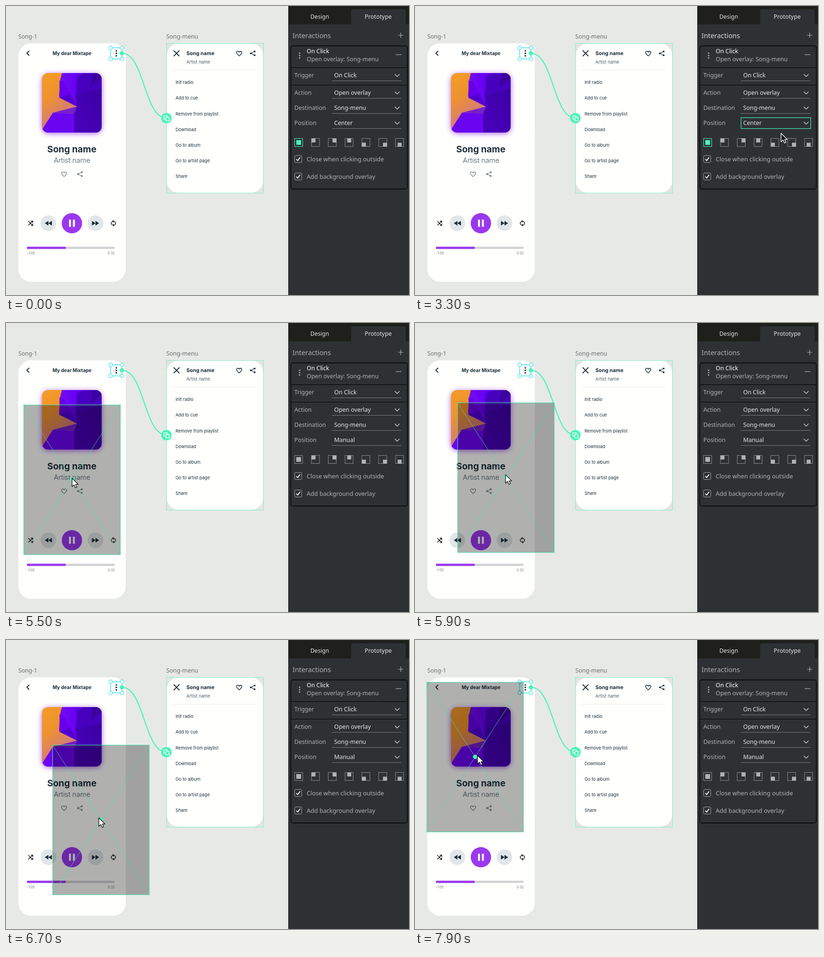
An HTML page for the animation above (8 s loop, 851 by 612 pixels).

```html
<!DOCTYPE html>
<html lang="en">
<head>
<meta charset="utf-8">
<title>Overlay position</title>
<style>
html, body { margin: 0; width: 100%; height: 100%; overflow: hidden; background: #e7e9e7; }
svg { display: block; width: 100%; height: 100%; }
.ui { font-family: "Noto Sans", "Open Sans", sans-serif; }
.app { font-family: Inter, Roboto, sans-serif; }
</style>
</head>
<body>
<svg id="stage" viewBox="0 0 851 612"></svg>
<script>
const GREEN = '#49f4b9', PANEL = '#2e3134', INK = '#1c2f3a', GREY = '#b1b2b5', LIGHT = '#e6e6e6', PAPER = '#fffffd';
const LOOP = 8000, STEP = 100;

const el = (tag, attrs, body = '') =>
  `<${tag} ${Object.entries(attrs).map(([k, v]) => `${k}="${v}"`).join(' ')}>${body}</${tag}>`;
const rect = (x, y, width, height, fill, more = {}) => el('rect', { x, y, width, height, fill, ...more });
const circle = (cx, cy, r, fill, more = {}) => el('circle', { cx, cy, r, fill, ...more });
const line = (d, stroke, width = 1, more = {}) =>
  el('path', { d, fill: 'none', stroke, 'stroke-width': width, ...more });
const shape = (d, fill, more = {}) => el('path', { d, fill, ...more });
const group = (body, attrs = {}) => el('g', attrs, body);

// y is the middle of the capital letters
const text = (s, x, y, size, fill, more = {}) =>
  el('text', { x, y: y + size * 0.36, 'font-size': size, fill, ...more }, s);
const mid = { 'text-anchor': 'middle' };

const heart = (x, y, color, w) => line(
  `M${x} ${y + 5}C${x - 4} ${y + 1.5} ${x - 5.5} ${y} ${x - 5.5} ${y - 2}C${x - 5.5} ${y - 5.5} ${x - 1.5} ${y - 6} ${x} ${y - 3}` +
  `C${x + 1.5} ${y - 6} ${x + 5.5} ${y - 5.5} ${x + 5.5} ${y - 2}C${x + 5.5} ${y} ${x + 4} ${y + 1.5} ${x} ${y + 5}Z`, color, w);
const share = (x, y, color) =>
  line(`M${x + 4} ${y - 4}L${x - 4} ${y}L${x + 4} ${y + 4}`, color, 1.2) +
  [[4, -4], [-4, 0], [4, 4]].map(([a, b]) => circle(x + a, y + b, 1.9, color)).join('');
const dots = (x, y, gap, r, color) => [-1, 0, 1].map(i => circle(x, y + i * gap, r, color)).join('');

function cover() {
  return rect(76, 144, 126, 126, '#8a2be2', { rx: 14, filter: 'url(#glow)', opacity: 0.75 }) +
    group(
      rect(76, 142, 126, 126, 'url(#warm)') +
      shape('M118 142H202V268H144V226L150 213L112 192L114 158Z', 'url(#violet)') +
      shape('M146 190L202 172V268H144V226L150 213Z', 'url(#deep)') +
      shape('M150 150L166 142H202V174L147 190Z', '#4700bd') +
      shape('M183 142H202V152L178 172Z', '#3c009f') +
      shape('M113 158L113 194L136 186L122 160Z', '#6800ec') +
      shape('M112 194L136 186L150 213Z', '#5200d2') +
      shape('M76 262L99 226L144 228V268H76Z', '#6a05f2') +
      shape('M99 226L150 213L144 228Z', '#7420c8'), { 'clip-path': 'url(#coverClip)' });
}

function player() {
  const skip = (x, s) =>
    circle(x, 460, 16.5, '#e1e6e8') +
    shape(`M${x} 455V465L${x - 7.5 * s} 460ZM${x + 7.5 * s} 455V465L${x} 460Z`, INK);
  return text('Song-1', 26, 65, 12.2, '#6b6f70', { class: 'ui' }) +
    rect(26, 79, 227, 505, PAPER, { rx: 27 }) +
    line('M49 95L44 100L49 105', INK, 1.8) +
    text('My dear Mixtape', 139.5, 100.5, 10, INK, { ...mid, 'font-weight': 700 }) +
    dots(233, 100.3, 5.2, 1.7, INK) + cover() +
    text('Song name', 139, 303.5, 19, INK, { ...mid, 'font-weight': 700 }) +
    text('Artist name', 139.5, 327, 14.6, '#40525c', { ...mid, 'font-weight': 300 }) +
    heart(122.7, 356.3, '#77838a', 1.3) + share(156, 356, '#77838a') +
    line('M47 455.5L56.5 465M47 464.5L56 456M52.5 455.5H56.5V459.5M52.5 464.8H56.5V460.8', '#15181a', 1.3) +
    skip(89.5, 1) + circle(139.2, 460, 21.5, '#9b38ef') +
    rect(133, 452.5, 4.2, 15, '#fff') + rect(141.2, 452.5, 4.2, 15, '#fff') + skip(189, -1) +
    line('M226.5 456A4.2 4.2 0 0 1 230 463.2M227 464.2A4.2 4.2 0 0 1 223.6 457', '#15181a', 1.4) +
    shape('M227 453V459L223.8 456ZM226.6 461V467L229.8 464Z', '#15181a') +
    rect(44, 509.7, 185.5, 4.8, '#d0d2d3', { rx: 2 }) + rect(44, 509.7, 82.5, 4.8, '#9b38ef', { rx: 2 }) +
    text('-1:05', 44, 523.5, 7, '#68757c') + text('3:32', 229.5, 523.5, 7, '#68757c', { 'text-anchor': 'end' });
}

function menu() {
  const items = ['Init radio', 'Add to cue', 'Remove from playlist', 'Download', 'Go to album', 'Go to artist page', 'Share'];
  return text('Song-menu', 338.5, 65, 12.4, '#6b6f70', { class: 'ui' }) +
    rect(339, 79, 205, 317, '#e4e6e3') + rect(339, 79, 204.5, 317, PAPER, { rx: 27 }) +
    rect(339, 79.3, 204.7, 316.9, 'none', { stroke: '#7cebc8' }) +
    line('M354 94.2L366.2 106.4M366.2 94.2L354 106.4', '#15252e', 1.9) +
    text('Song name', 381, 100.5, 10.8, INK, { 'font-weight': 700 }) +
    text('Artist name', 381, 119, 9.3, '#4f5f68') +
    heart(492.5, 100.7, INK, 1.4) + share(521, 100.3, INK) +
    line('M351 136H528', '#e9eae9') +
    items.map((s, i) => text(s, 358, 162 + i * 33.1, 9.2, INK)).join('');
}

function connector() {
  const corners = [[221, 88.5], [245, 88.5], [221, 112], [245, 112]];
  return rect(221, 88.5, 24, 23.5, 'none', { stroke: '#31dfe2', 'stroke-width': 1.3 }) +
    corners.map(([x, y]) => circle(x, y, 3.8, '#fff', { stroke: '#31dfe2', 'stroke-width': 1.2 })).join('') +
    line('M245 100C292 100 292 237 338 237', GREEN, 2.2) + circle(244.7, 100.2, 4.6, GREEN) +
    circle(338.7, 237.4, 11, GREEN) +
    rect(333.5, 232.5, 7, 7, 'none', { stroke: '#fff', 'stroke-width': 1.4 }) +
    rect(337.5, 236, 7, 7, GREEN, { stroke: '#fff', 'stroke-width': 1.4 });
}

function panel() {
  const chevron = y => line(`M821 ${y - 2.6}L826 ${y + 2.4}L831 ${y - 2.6}`, LIGHT, 1.3);
  const field = (label, value, y, id) =>
    text(label, 609, y, 12.3, GREY) + text(value, 693, y, 12.4, LIGHT, id ? { id } : {}) +
    line(`M688 ${y + 11.5}H835`, '#7b7e80') + chevron(y);
  const check = (label, y) =>
    rect(609.5, y - 7.5, 15, 15, PANEL, { rx: 2.5, stroke: '#a3a5a7' }) +
    line(`M613 ${y + 0.3}L616 ${y + 3.3}L621 ${y - 3.5}`, '#fff', 1.8) +
    text(label, 635, y, 12.65, GREY);
  const spots = [[4, 4], [0, 0], [9, 0], [4.5, 0], [0, 9], [9, 9], [4.5, 9]];
  const places = spots.map(([dx, dy], i) => {
    const x = 609 + i * 35.5;
    return rect(x + 0.5, 280.5, 17, 17, 'none', { stroke: '#8b8e90', class: i ? '' : 'center-box' }) +
      rect(x + dx + (i ? 0.5 : 0), 280 + dy + (i ? 0.5 : 0), i ? 8.5 : 10, i ? 8.5 : 10, GREY, { class: i ? '' : 'center-fill' });
  }).join('');
  return rect(596, 0, 255, 612, PANEL) + rect(596, 0, 255, 39, '#1f1f1c') +
    line('M596.5 0V612', '#222426') +
    shape('M729 39V10Q729 7 732 7H841Q844 7 844 10V39Z', PANEL) +
    text('Design', 662.5, 23, 12.1, LIGHT, { ...mid }) + text('Prototype', 786, 23, 12.3, LIGHT, { ...mid }) +
    text('Interactions', 605, 62.5, 14.4, GREY, { id: 'title' }) +
    line('M828 62H839M833.5 56.5V67.5', GREY, 1.2) +
    rect(601.5, 84.5, 246, 303, 'none', { rx: 4, stroke: '#000', 'stroke-width': 1.3 }) +
    line('M602 130.5H847M602 167.5H847', '#000', 1.2) +
    dots(620, 105, 5, 1.5, GREY) +
    text('On Click', 635, 96, 12.4, '#fff') + text('Open overlay: Song-menu', 635, 113, 12.45, GREY) +
    line('M823 103H835', GREY, 1.2) +
    field('Trigger', 'On Click', 147) + field('Action', 'Open overlay', 184) +
    field('Destination', 'Song-menu', 216) + field('Position', 'Center', 248, 'value') +
    rect(688.5, 236.5, 147, 23, 'none', { id: 'focus', stroke: GREEN, 'stroke-width': 1.2 }) +
    places + check('Close when clicking outside', 324) + check('Add background overlay', 361);
}

const options = ['Manual', 'Center', 'Top left', 'Top right', 'Top center', 'Bottom left', 'Bottom right', 'Bottom center'];
const ROW = 15.43;
function dropdown() {
  return rect(688, 260, 148, 125, '#000', { filter: 'url(#soft)', opacity: 0.45 }) +
    rect(688.5, 260.5, 147, 124, '#fff', { stroke: '#77797b' }) +
    rect(689, 0, 146, ROW, '#1e90fb', { id: 'bar' }) +
    options.map((s, i) => text(s, 693, 268.2 + i * ROW, 12.5, '#1d1f20', { class: 'option' })).join('');
}

function ghost() {
  return rect(0.5, 0.5, 204, 317, '#000', { 'fill-opacity': 0.31, stroke: '#4cdcb0', 'stroke-width': 1.1 }) +
    line('M0 0L205 317M205 0L0 317', '#4fd8b1', 0.9, { opacity: 0.85 }) + circle(102.5, 158.5, 4.6, GREEN);
}

const ARROW = 'M0 0V18L4.3 14.2L7.2 20.6L10.3 19.2L7.5 13.2H13Z';
const HAND = 'M4.6 1.6Q4.6 0 6 0Q7.4 0 7.4 1.6V6Q9.3 5.2 9.8 6.6Q11.6 5.9 12 7.4Q14 7 14 9V11.5Q14 13.5 12.6 16H5.8Q4.8 13.6 2.8 11.6L0.6 9Q0.4 7.4 2.3 7.7L4.6 9.4Z';

const stage = document.getElementById('stage');
const stops = list => list.map(([offset, c]) => el('stop', { offset, 'stop-color': c })).join('');
stage.innerHTML =
  el('defs', {},
    el('linearGradient', { id: 'warm', x1: 0, y1: 0, x2: 0.6, y2: 0.8 }, stops([[0, '#f59d25'], [0.4, '#ee922f'], [0.7, '#d98069'], [1, '#bd6896']])) +
    el('linearGradient', { id: 'violet', x1: 0, y1: 0.2, x2: 1, y2: 0 }, stops([[0, '#7410f0'], [0.35, '#6900f5'], [1, '#4800bd']])) +
    el('linearGradient', { id: 'deep', x1: 0, y1: 1, x2: 1, y2: 0 }, stops([[0, '#4b00bd'], [1, '#3b00a4']])) +
    el('clipPath', { id: 'coverClip' }, rect(76, 142, 126, 126, '#000', { rx: 13 })) +
    el('filter', { id: 'glow', x: '-30%', y: '-30%', width: '160%', height: '160%' }, el('feGaussianBlur', { stdDeviation: 6 })) +
    el('filter', { id: 'soft', x: '-20%', y: '-20%', width: '140%', height: '140%' }, el('feGaussianBlur', { stdDeviation: 5 }))) +
  rect(0, 0, 851, 612, '#e7e9e7') +
  group(player() + menu(), { class: 'app' }) + connector() +
  group(ghost(), { id: 'ghost' }) +
  group(panel(), { class: 'ui' }) +
  group(dropdown(), { class: 'ui', id: 'dropdown' }) +
  shape(ARROW, '#111', { id: 'arrow', 'stroke-width': 1.3, 'stroke-linejoin': 'round' }) +
  shape(HAND, '#fff', { id: 'hand', stroke: '#111', 'stroke-width': 1, transform: 'translate(768 243.3)' });

const $ = id => document.getElementById(id);
const show = (node, on) => node.setAttribute('display', on ? 'inline' : 'none');
const set = (node, attrs) => Object.entries(attrs).forEach(([k, v]) => node.setAttribute(k, v));
const move = (node, [x, y]) => node.setAttribute('transform', `translate(${x} ${y})`);
const part = { ghost: $('ghost'), drop: $('dropdown'), arrow: $('arrow'), hand: $('hand'), bar: $('bar'), title: $('title'), value: $('value'), focus: $('focus') };
const centerBox = stage.querySelector('.center-box');
const centerFill = stage.querySelector('.center-fill');
const optionNodes = stage.querySelectorAll('.option');

// Keys are [time, x, y]
function along(keys, t) {
  if (t <= keys[0][0]) return keys[0].slice(1);
  const i = keys.findIndex(k => k[0] >= t);
  if (i < 0) return keys[keys.length - 1].slice(1);
  const [a, b] = [keys[i - 1], keys[i]], f = (t - a[0]) / (b[0] - a[0]);
  return [a[1] + (b[1] - a[1]) * f, a[2] + (b[2] - a[2]) * f];
}

const pointerKeys = [
  [800, 768, 515], [900, 769, 430], [1000, 770, 335], [1100, 770, 280], [1200, 770, 261],
  [2100, 772, 246], [2200, 772, 254], [2300, 772, 263], [2400, 772, 268.5], [2500, 772, 268.5], [2600, 773, 269.5],
  [3900, 773, 269.5], [4000, 750, 268], [4100, 680, 266], [4200, 570, 270], [4400, 360, 288],
  [4600, 195, 306], [4700, 165, 310], [4800, 165, 310], [5000, 155, 318], [5300, 139, 328.5]];
const ghostKeys = [
  [5500, 37, 173], [5700, 48, 172], [5800, 66, 170], [6000, 113, 167], [6200, 154, 167], [6300, 165, 169],
  [6400, 166, 180], [6500, 154, 200], [6600, 131, 214], [6700, 98, 222], [6800, 69, 227], [6900, 44, 223],
  [7100, 10, 200], [7300, -2, 174], [7500, 0, 151], [7700, 14, 113], [7800, 21, 97], [7900, 24.5, 89]];
const gripKeys = [[5500, 0, -3], [6200, -1.5, -8], [6700, -4.5, -4], [7900, 5, -3]];

function draw(t) {
  const chosen = t >= 3400, open = t >= 1800 && t < 3300;
  const hand = t >= 1400 && t < 2200, hover = t >= 1000 && t < 4200;
  const inCanvas = t >= 4200;
  const box = along(ghostKeys, t);

  show(part.ghost, chosen);
  move(part.ghost, box);
  show(part.drop, open);
  const row = t < 2300 ? 1 : 0;
  part.bar.setAttribute('y', 260.6 + row * ROW);
  optionNodes.forEach((n, i) => n.setAttribute('fill', i === row ? '#fff' : '#1d1f20'));

  part.title.setAttribute('fill', hover ? '#dcdddf' : GREY);
  part.value.textContent = chosen ? 'Manual' : 'Center';
  show(part.focus, t >= 1800 && t < 5400);
  centerBox.setAttribute('stroke', chosen ? '#8b8e90' : GREEN);
  centerFill.setAttribute('fill', chosen ? GREY : GREEN);

  show(part.hand, hand);
  show(part.arrow, t >= 800 && !hand);
  set(part.arrow, { fill: inCanvas ? '#fff' : '#111', stroke: inCanvas ? '#111' : '#fff' });
  const grip = along(gripKeys, t);
  move(part.arrow, t < 5500 ? along(pointerKeys, t) : [box[0] + 102.5 + grip[0], box[1] + 158.5 + grip[1]]);
}

const start = performance.now();
function tick() {
  const t = (performance.now() - start) % LOOP;
  draw(Math.floor(t / STEP) * STEP);
  requestAnimationFrame(tick);
}
tick();
</script>
</body>
</html>
```
